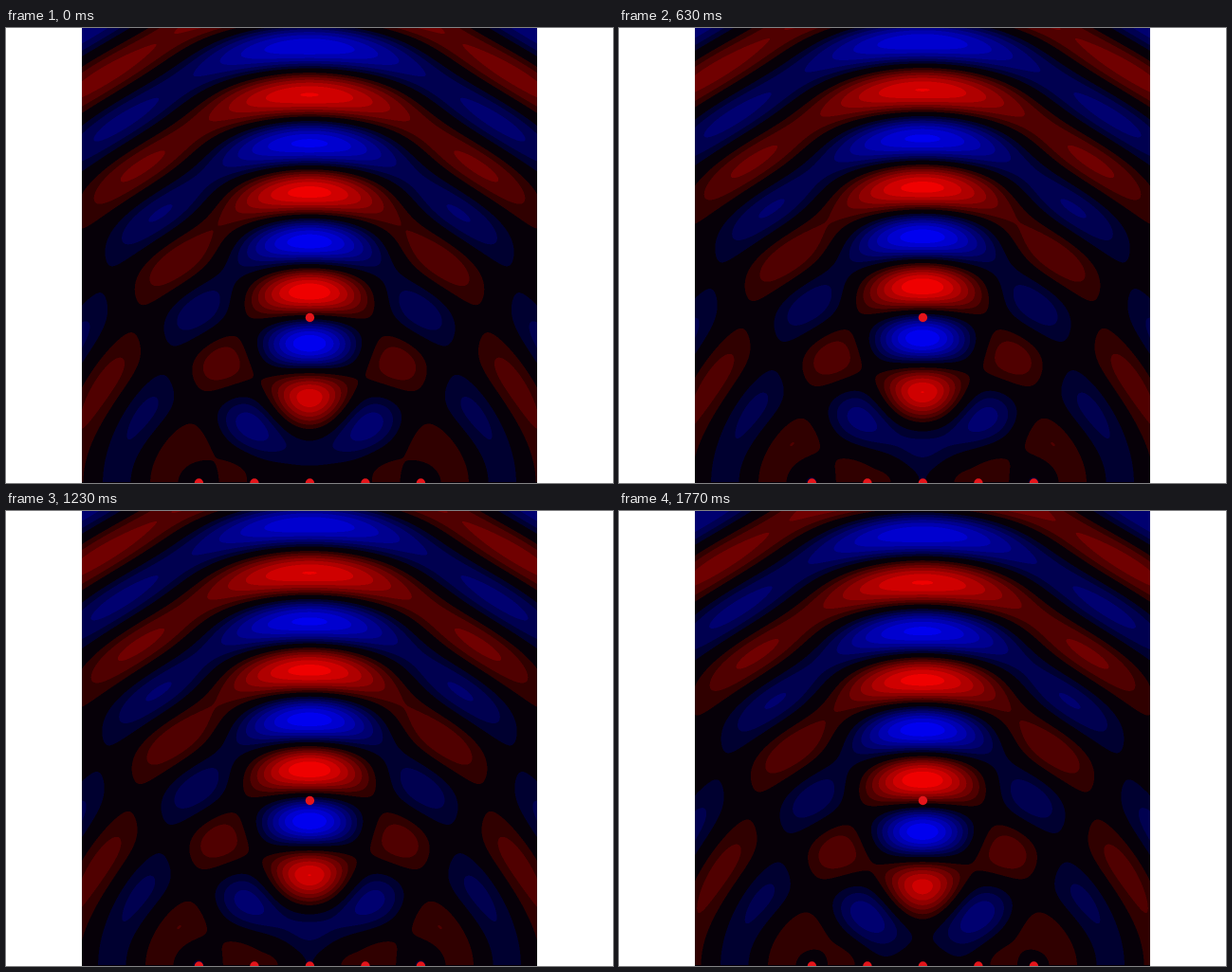
An HTML page with a canvas for the animation above (1.8 s loop, 640x480 px).

```html
<!DOCTYPE html>
<html lang="en">
<head>
<meta charset="utf-8">
<title>Focused wave array</title>
<style>
html, body { margin: 0; width: 100%; height: 100%; overflow: hidden; background: #fff; }
canvas { display: block; width: 640px; height: 480px; }
</style>
</head>
<body>
<canvas id="stage" width="640" height="480"></canvas>
<script>
const ctx = document.getElementById('stage').getContext('2d');
const SIZE = 480, LEFT = 80, SS = 2, GRID = SIZE * SS;
const STEP = 30, STEPS = 20, WAVELENGTH = 100;
const K = 2 * Math.PI / WAVELENGTH;
const FOCUS = 175;
const emitters = [-2, -1, 0, 1, 2].map(i => i * 58.5);

// Two quadrature parts of the summed field, sampled SS times per pixel
const partA = new Float32Array(GRID * GRID);
const partB = new Float32Array(GRID * GRID);
for (let j = 0; j < GRID; j++) {
  const h = SIZE - (j + 0.5) / SS;
  for (let i = 0; i < GRID; i++) {
    const x = (i + 0.5) / SS - SIZE / 2;
    let a = 0, b = 0;
    for (const e of emitters) {
      const phase = K * (Math.hypot(x - e, h) - Math.hypot(e, FOCUS));
      a += Math.sin(phase);
      b += Math.cos(phase);
    }
    partA[j * GRID + i] = a / emitters.length;
    partB[j * GRID + i] = b / emitters.length;
  }
}

// Eight bands on each side of zero: blue below, red above
const bands = [];
for (let n = -8; n < 8; n++) {
  const c = (n + 0.5) / 8 * 255;
  bands.push(n === 0 || n === -1 ? [6, 0, 8] : [Math.max(c, 0), 0, Math.max(-c, 0)]);
}

function renderField(step) {
  const img = ctx.createImageData(SIZE, SIZE);
  const angle = 2 * Math.PI * step / STEPS;
  const c = Math.cos(angle), s = Math.sin(angle);
  for (let y = 0; y < SIZE; y++) {
    for (let x = 0; x < SIZE; x++) {
      let r = 0, g = 0, b = 0;
      for (let v = 0; v < SS; v++) {
        for (let u = 0; u < SS; u++) {
          const k = (y * SS + v) * GRID + x * SS + u;
          const value = partA[k] * c - partB[k] * s;
          const col = bands[Math.max(0, Math.min(15, Math.floor(value * 8) + 8))];
          r += col[0]; g += col[1]; b += col[2];
        }
      }
      const p = (y * SIZE + x) * 4, n = SS * SS;
      img.data[p] = r / n;
      img.data[p + 1] = g / n;
      img.data[p + 2] = b / n;
      img.data[p + 3] = 255;
    }
  }
  return img;
}

function dot(x, y) {
  ctx.beginPath();
  ctx.arc(x, y, 4.7, 0, 2 * Math.PI);
  ctx.fill();
}

const cache = [];
let shown = -1;

function draw(step) {
  if (!cache[step]) cache[step] = renderField(step);
  ctx.fillStyle = '#fff';
  ctx.fillRect(0, 0, 640, 480);
  ctx.putImageData(cache[step], LEFT, 0);
  ctx.fillStyle = '#060008';
  ctx.fillRect(LEFT, SIZE - 1, SIZE, 1);
  ctx.fillStyle = '#e4141a';
  for (const e of emitters) dot(320.4 + e, SIZE);
  dot(320.4, SIZE - FOCUS + 0.5);
}

let start = null;
function tick(now) {
  if (start === null) start = now;
  const step = Math.floor(Math.max(0, now - start) / STEP) % STEPS;
  if (step !== shown) {
    draw(step);
    shown = step;
  }
  requestAnimationFrame(tick);
}
draw(0);
requestAnimationFrame(tick);
</script>
</body>
</html>
```
